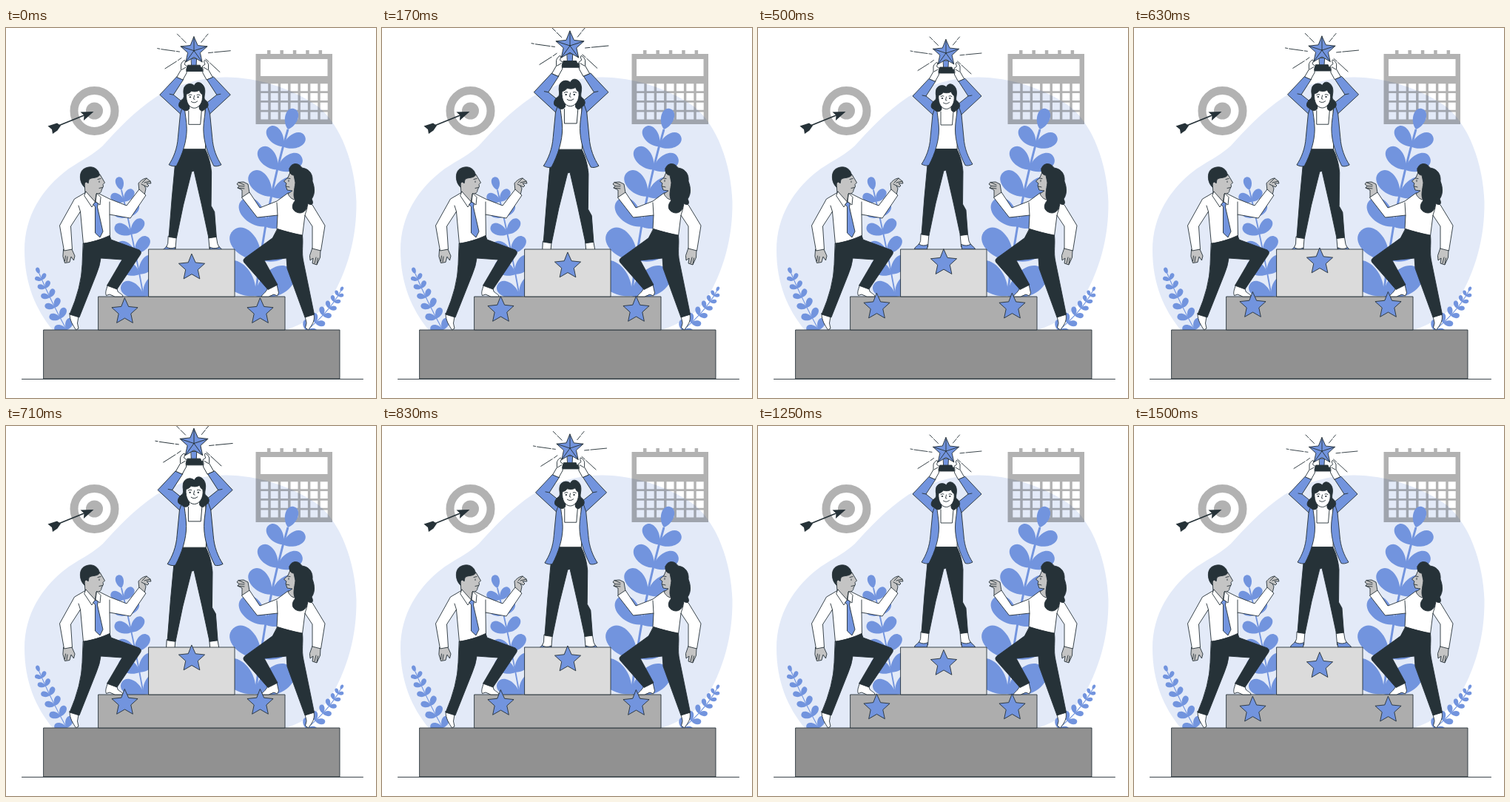
An HTML page that plays this animation: 500x500 px, repeating every 1540 ms.

```html
<!DOCTYPE html>
<html lang="en">
<head>
<meta charset="utf-8">
<title>Winner podium</title>
<style>
  html, body { margin: 0; width: 100%; height: 100%; overflow: hidden; background: #fff; }
  svg { display: block; width: 100vw; height: 100vh; }
  .ln { stroke: #263238; stroke-width: .9; stroke-linejoin: round; stroke-linecap: round; }
  .w { fill: #fff; }
  .b { fill: #7294de; }
  .d { fill: #263238; }
  .s { fill: #c4c4c4; }
  .n { fill: none; }
</style>
</head>
<body>
<svg viewBox="0 0 500 500" xmlns="http://www.w3.org/2000/svg">
  <path fill="#e3eaf8" d="M298,66.500 C340,67 385,81 420,105 C453,130 472,185 473.500,235 C474,285 461,328 440,364 C425,386 405,399 378,408 H63 C40,380 25,345 25,300 C25,255 48,217 85,190 C105,177 118,171 131,159 C150,138 172,114 203,93 C233,76 265,66 298,66.500Z"/>

  <g id="target">
    <circle cx="119.500" cy="112" r="27.500" fill="none" stroke="#000" stroke-opacity=".3" stroke-width="11"/>
    <circle cx="119.500" cy="112" r="11.500" fill-opacity=".3"/>
    <path d="M66,134 L108,117" stroke="#263238" stroke-width="1.700"/>
    <path class="d" d="M118.500,113 L100.500,113.500 L105.500,118 L105,125Z M56.500,132.500 L69,128.500 L74,132 L69.500,138.500 L63,143 L62,137Z"/>
  </g>

  <path id="calendar" fill-rule="evenodd" fill-opacity=".3"/>
  <g id="plants" class="b"></g>
  <path class="ln" d="M21.500,474.500 H482.500"/>

  <g id="hero" class="ln">
    <g class="n">
      <path d="M232,12 L236,16 M237.500,17.500 L243.500,23.500"/>
      <path d="M206,31 L209,31.500 M211,32 L229,34.500 M231,34.800 L235,35.300"/>
      <path d="M216,57.500 L231,48 M233,46.700 L237.500,43.500"/>
      <path d="M272.500,12 L269,16 M268,17.500 L263.500,23"/>
      <path d="M302,34 L281,36 M279,36.200 L273,36.800"/>
      <path d="M288,62 L275,50 M273.500,48.500 L269.500,45"/>
    </g>

    <path class="w" d="M220.500,278 H231 L229.500,296 H216 L219.500,288Z M273.500,279 H283.500 L285,288 L289,296 H275Z"/>
    <path class="b" d="M217.500,292 C221,294.500 226,294.500 229.500,292.500 L228.500,299 H211.500 C211.500,296 215,295 217.500,292Z M275,292.500 C279,294.500 284,294.500 287.500,292 C289,295 293,296 293.500,299 H276Z"/>
    <path class="d" d="M240,162 H268 C273,172 276,182 277,194 L276.500,238 L281,246 L283.500,279 L273.500,280.500 L264,236 L254,192 L251,193 L240,237 L231,280.500 L221,279 L225,228 L229,185Z"/>
    <path class="w" d="M243,106 H268 L270,130 L269,163.500 H239 L239,130Z"/>
    <g id="arm">
      <path class="b" d="M231,68.500 L209,92 L236,117 L233,148 C232,163 227,175 221,184 C225,186 228,186.500 231,185.500 C239,170 244.500,153 244.500,137 C244.500,127 242,116 241.500,107 L242,104 L227,92 L240,72Z"/>
      <path class="n" d="M236,117 L239,108 M227,92 L222,91"/>
    </g>
    <use href="#arm" transform="matrix(-1 0 0 1 511 0)"/>

    <path class="d" d="M246,53 H262 L263,56 H264.500 L265.500,61 H242.500 L243.500,56 H245Z"/>
    <path class="b" d="M250.500,44 H257.500 L257,53 H251Z"/>
    <path id="hand" class="w" d="M231.500,68.500 L237,59 L237,52 C238,49 240,47 242,46.500 C243.500,48 242,50 241.500,52 L245,54.500 L244,59 L244.500,63 L239.500,72Z M238,59 L243,56"/>
    <use href="#hand" transform="matrix(-1 0 0 1 510 0)"/>
    <path id="cup" class="b"/>
    <path id="facets" class="n"/>

    <path class="n" d="M247,113 V131 H262.500 L264,113"/>
    <path class="d" d="M254.500,80 C250,75 241,78 240.500,85 C239.500,90 242,93 240,97 C233,101 232,109 238,110 C241,114 247,114 248.500,109 H260.500 C262,114.500 267,114 268,110.500 C274,109 274.500,102 268,98 C266.500,94 270,89 267.500,82 C264,74 256,74 254.500,80Z"/>
    <path class="w" stroke="none" d="M248.500,104 H260.500 V116 H248.500Z"/>
    <path class="w" d="M244,91 C247,90.500 249,89 250.500,87 C255,88.500 259,87.500 261,86 C262,89 263,90.500 265,91.500 C266.500,102 260.500,109.500 254.500,109.500 C248,109.500 243,102 244,91Z"/>
    <path class="n" d="M247,92.500 Q249,91 251,92 M258,92 Q260,91 262,92.500 M254.500,93 L253.500,97.500 L255,98 M250.500,101 Q254.500,104 258.500,100.500"/>
    <path class="d" d="M248.700,94.500 h1 v1 h-1Z M259,94.500 h1 v1 h-1Z"/>
  </g>

  <g id="podium" class="ln">
    <path fill="#919191" d="M51,408 H451 V474 H51Z"/>
    <path fill="#adadad" d="M125,363 H377 V408 H125Z"/>
    <path fill="#dbdbdb" d="M193,299 H309 V363 H193Z"/>
  </g>

  <g id="man" class="ln">
    <path class="w" d="M86,386 L98,390 L96.500,399 L98,406 L94.500,408 C91,402 86,396 86,386Z"/>
    <path class="w" d="M137.500,347 L150,352 L151,356 C154,359 158,360 158,363 H147 L140,360 L135.500,361.500 C133.500,357 136,353 137.500,347Z"/>
    <path class="s" d="M78,299 H89 L93,308 L91.500,314 L88,309 L86,316.500 L79.500,317.500 L77,309Z"/>
    <path class="n" d="M82,316 L83,309 M79.500,315 L80.500,308"/>
    <path class="s" d="M180,220 L179,210 C181,207 186,203 190,203 L195,207 L196,210 L190,210 L193,213 L191,215 L187,213 L189,217 L187,226Z"/>
    <path class="n" d="M190,203 L184,209 M195,207 L187,209 M187,213 L183,211"/>
    <path class="w" d="M108,222 L92.500,231 L72.500,267 L78.500,301 L89.500,299 L87.500,268 L100.500,248 L104.500,292 L140.500,283 L140,252 L168,257 L189,226 L180,218 L163,240 L140,231 L124,223Z"/>
    <path class="n" d="M100.500,248 L98,240 M140,252 V235"/>
    <path class="s" d="M106,210 L107,223 L120,237 L122,224 C126,224 129,223 129,219 L131.500,214 L131,211.500 L133.500,209 L127,198 L110,200Z"/>
    <path class="d" d="M106,215 C99,209 98,194 106,190 C115,185 125,189 126.500,199 C122,204 116,201 112,205 L111,210 C108,206 105,209 106,215Z"/>
    <path class="n" d="M124,204.500 L128,203.500 M126,207 V208.500 M126,216.500 L130.500,215.500"/>
    <path class="w" d="M108,221 L120.500,235 L116,242 L106,227Z M122.500,223.500 L121,235 L127,239 L128,229Z"/>
    <path class="b" d="M118,238 L121,235 L124.500,237 L123.500,242 L131,275 L127,283 L120.500,277 L120.500,242Z"/>
    <path class="d" d="M104.500,291 C116,290 130,285 140,280.500 L142,286 L180,300 C183,302 183,304 181,307 L150,353 L136.500,348 L157,313 L128,311 Q127,321 122,333 L99,391 L86,387 Q102,350 103,320Z"/>
  </g>

  <g id="woman" class="ln">
    <path class="w" d="M404.500,390 L416,387 C418,396 413,402 408.500,408 L404.500,405 L406,399Z"/>
    <path class="w" d="M353.500,352 L366,346.500 L368.500,358 L366.500,362 L362,360 L355,363 H345 C346,360 351,358 353.500,352Z"/>
    <path class="s" d="M414.500,297 L425,300 L424.500,310 L420,320 L414,318 L415,311 L411,314 L410.500,308Z"/>
    <path class="n" d="M417,318 L419,310 M420,319 L421.500,311"/>
    <path class="s" d="M319,229 L319,219 L313,216 L315,213.500 L312,211 L314,208.500 L321,208 L327,211 L329,223Z"/>
    <path class="n" d="M313,216 L322,217 M315,213.500 L322,214 M314,208.500 L322,212"/>
    <path class="w" d="M381,223 L366,234 L343,243 L329,222 L318.500,229 L339.500,256 L367,253 L366,272 L400.500,281 L404,253 L414,268 L414,298 L425.500,301 L431,267 L414,239 L400,231Z"/>
    <path class="n" d="M367,253 L366,236 M404,253 L407,243"/>
    <path class="s" d="M384,195 L381,202 L375.500,207 L379,210 L378,213 L380,219 L387,220 L381,224 C384,231 391,234 395,231 L397,200Z"/>
    <path class="d" d="M383,190 C386,181 396,182 400,189 C410,190 415,198 414,207 C418,217 417,226 413,231 C417,239 412,240 408,237 C407,248 399,253 391,248 C385,244 387,237 391,233 C387,227 390,218 391,209 L389,199 C385,199 382,195 383,190Z"/>
    <path class="n" d="M380.500,203 L384,203.500 M382,205.500 V207.500 M379,214 L383,215"/>
    <path class="d" d="M367,271.500 C378,275 389,278 400.500,280 C402,293 399,302 402,316 L416.500,387 L404,391 L380,325 L379,311 L349,314 L367,347 L354,353.500 L322,317 C320,314 321,312 324,310 L360,284Z"/>
  </g>

  <g id="stars" class="b ln"></g>
</svg>

<script>
const NS = 'http://www.w3.org/2000/svg';
const $ = id => document.getElementById(id);

function add(parent, attrs) {
  const el = document.createElementNS(NS, 'path');
  for (const k in attrs) el.setAttribute(k, attrs[k]);
  parent.appendChild(el);
}

function starPoints(cx, cy, r, inner) {
  return Array.from({ length: 10 }, (_, i) => {
    const a = (i * 36 - 90) * Math.PI / 180, q = i % 2 ? r * inner : r;
    return [(cx + q * Math.cos(a)).toFixed(2), (cy + q * Math.sin(a)).toFixed(2)];
  });
}
const poly = pts => 'M' + pts.join('L') + 'Z';
const box = (x, y, w, h) => `M${x},${y}h${w}v${h}h${-w}Z`;

// Calendar: frame, header window, rings and day cells
let cal = box(337.5, 35, 103.5, 95) + box(344, 42, 90.5, 23);
for (let i = 0; i < 5; i++) cal += box(353 + i * 17.4, 30, 4.5, 5);
for (let r = 0; r < 4; r++)
  for (let c = 0; c < 7; c++) cal += box(344.3 + c * 13.4, 75.3 + r * 12.7, 10, 10);
$('calendar').setAttribute('d', cal);

// Plants: leaf pairs grow in size and spacing down a curved stem
function leaf(x, y, deg, len) {
  const w = len * .4;
  add($('plants'), {
    d: `M0,0C${len * .3},${-w} ${len},${-w} ${len},0C${len},${w} ${len * .3},${w} 0,0Z`,
    transform: `translate(${x} ${y}) rotate(${deg})`
  });
}
function sprig(a, b, c, pairs, small, large) {
  add($('plants'), { d: `M${a}Q${b} ${c}`, fill: 'none', stroke: '#7294de', 'stroke-width': large / 25 + .5 });
  const at = (t, k) => (1 - t) ** 2 * a[k] + 2 * t * (1 - t) * b[k] + t * t * c[k];
  for (let i = 0; i <= pairs; i++) {
    const t = (i / pairs) ** 1.2, x = at(t, 0), y = at(t, 1);
    const up = Math.atan2(at(t - .05, 1) - y, at(t - .05, 0) - x) * 180 / Math.PI;
    const len = small + (large - small) * t;
    for (const turn of i ? [-51, 49] : [0]) leaf(x, y, up + turn, len);
  }
}
sprig([381, 137], [352, 235], [337, 362], 6, 29, 60);
sprig([156, 219], [172, 285], [186, 363], 6, 18, 34);
sprig([45, 332], [60, 368], [82, 408], 6, 9, 17);
sprig([452, 356], [438, 382], [406, 409], 6, 7, 15);

// Stars
const cup = starPoints(254, 34, 18.3, .47);
$('cup').setAttribute('d', poly(cup));
$('facets').setAttribute('d', cup.filter((_, i) => i % 2 === 0).map(p => `M254,34L${p}`).join(''));
[[251, 324.5], [160.5, 384], [343.5, 384]].forEach(([x, y]) =>
  add($('stars'), { d: poly(starPoints(x, y, 18.5, .47)) }));

// Motion: a double heartbeat and a linear float, at 37 steps per loop
const LOOP = 1540, STEPS = 37;
const pulse = (p, peak, rise, fall) =>
  Math.max(0, 1 - Math.abs(p - peak) / (p < peak ? rise : fall));

function draw(ms) {
  const n = Math.floor((ms + 5) / LOOP * STEPS) % STEPS;
  const p = (n + 1) / STEPS;
  const size = 1 + .1 * (pulse(p, .1, .1, .2) + pulse(p, .5, .1, .1));
  const lift = -10 * pulse(p, .5, .5, .5);
  $('hero').setAttribute('transform',
    `translate(254 155.5) scale(${size}) translate(-254 -155.5)`);
  $('stars').setAttribute('transform', `translate(0 ${lift})`);
}

const start = performance.now();
function tick(now) {
  draw(Math.max(0, now - start));
  requestAnimationFrame(tick);
}
draw(0);
requestAnimationFrame(tick);
</script>
</body>
</html>
```
